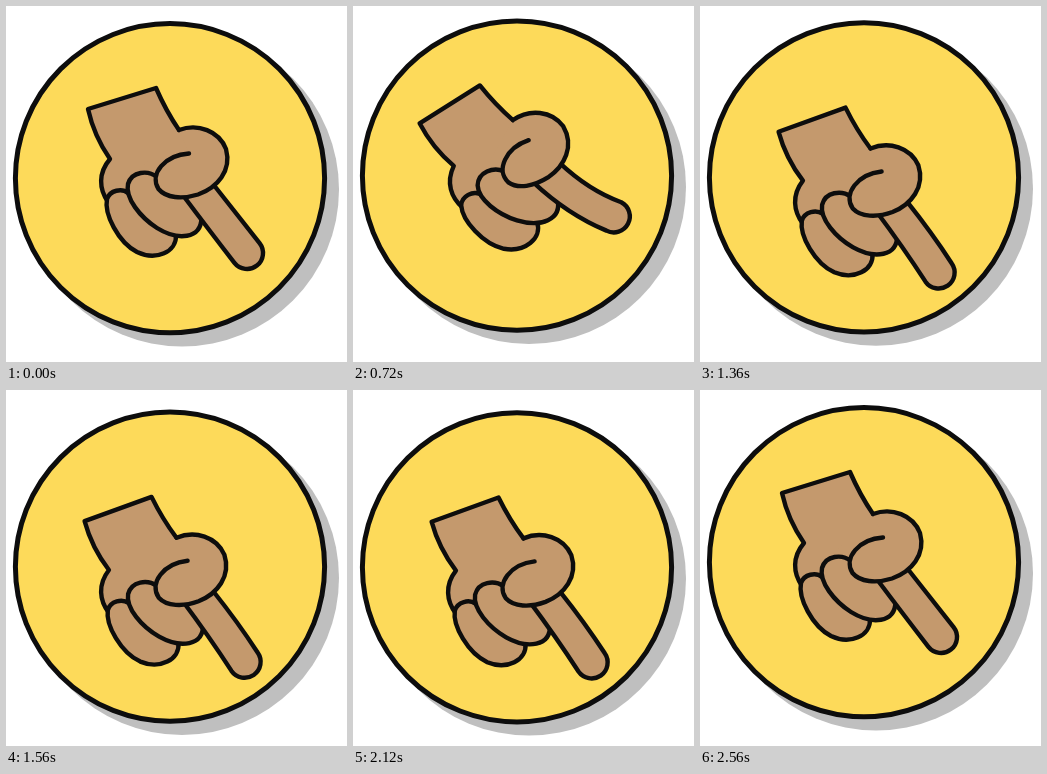
Animation, 341 px wide and 356 px high, one loop 3.36 s. Source, as an HTML page:

```html
<!DOCTYPE html>
<html lang="en">
<head>
<meta charset="utf-8">
<title>Pointing hand</title>
<style>
  html, body { margin: 0; width: 100%; height: 100%; overflow: hidden; background: #fff; }
  svg { display: block; width: 341px; height: 356px; }
  #hand { fill: #c4996d; stroke: #0d0d0d; stroke-width: 4.4; stroke-linecap: round; stroke-linejoin: round; }
</style>
</head>
<body>
<svg viewBox="0 0 341 356">
  <g id="badge">
    <circle cx="176" cy="183.5" r="157" fill="#bfbfbf"/>
    <circle cx="164" cy="172.2" r="154.6" fill="#fdda5a" stroke="#0d0d0d" stroke-width="5"/>
    <g id="hand">
      <path stroke="none" d="M104 153L173 124L195 150L194 208L150 215L102 197Z"/>
      <path d="M102 196C93 183 92 167 104 153Q88 130 82 103L150 82Q160 105 173 124"/>
      <path d="M122 187C116 182 104 184 101 193C98 208 112 236 131 246C150 255 171 246 170 229"/>
      <path d="M151 171C142 164 126 165 122 178C119 192 134 211 151 222C172 235 195 233 195.5 212"/>
      <path id="finger"/>
      <path d="M173 124C192 117 213 125 220 143C226 165 211 182 192 188.5C176 193.5 160 192 152.5 183C143 168 159 149 183 147.5"/>
    </g>
  </g>
</svg>
<script>
const LOOP = 3360, STEP = 40;
const $ = id => document.getElementById(id);
const badge = $('badge'), hand = $('hand'), finger = $('finger');

const easeIn = k => p => p ** k;
const easeOut = k => p => 1 - (1 - p) ** k;
const inOut = p => (1 - Math.cos(Math.PI * p)) / 2;

// Each row: time, value(s), easing used to arrive there
const badgeTrack = [
  [280, [0]],
  [1240, [-13], easeIn(2.1)],
  [1360, [-0.8], easeOut(1.2)],
  [1900, [10], easeOut(1.45)],
  [2540, [0], easeOut(1.6)]
];

// x, y, hand turn and finger swing in degrees, finger curl
const handTrack = [
  [280, [0, 0, 0, 0, 0]],
  [1240, [-18.3, 20, -17.8, -5, 1], easeOut(3)],
  [1360, [-3.4, 23.6, -2.7, 5, -0.2], inOut],
  [2130, [-3.4, 23.6, -2.7, 5, -0.2], inOut],
  [2560, [0, 0, 0, 0, 0], inOut]
];

function sample(track, t) {
  const i = track.findIndex(row => row[0] > t);
  if (i === 0) return track[0][1];
  if (i < 0) return track[track.length - 1][1];
  const [t0, from] = track[i - 1], [t1, to, ease] = track[i];
  const p = ease((t - t0) / (t1 - t0));
  return from.map((v, n) => v + (to[n] - v) * p);
}

function fingerPath(curl) {
  const r = 16, x = 241, y = 247;
  const a = (51.8 - 6 * curl) * Math.PI / 180;
  const nx = r * Math.sin(a), ny = r * Math.cos(a);
  const cx = -6 * curl, cy = 7 * curl;
  return `M176 188Q${203 + cx} ${224 + cy} ${x - nx} ${y + ny}` +
    `A${r} ${r} 0 0 0 ${x + nx} ${y - ny}Q${231 + cx} ${208.5 + cy} 207 178`;
}

function draw(time) {
  const t = Math.floor(time % LOOP / STEP) * STEP;
  const [lift] = sample(badgeTrack, t);
  const [x, y, turn, swing, curl] = sample(handTrack, t);
  badge.setAttribute('transform', `translate(0 ${lift})`);
  hand.setAttribute('transform', `translate(${x} ${y}) rotate(${turn} 82 103)`);
  finger.setAttribute('transform', `rotate(${swing} 191 183)`);
  finger.setAttribute('d', fingerPath(curl));
}

const start = performance.now();
function tick() {
  draw(performance.now() - start);
  requestAnimationFrame(tick);
}
tick();
</script>
</body>
</html>
```
